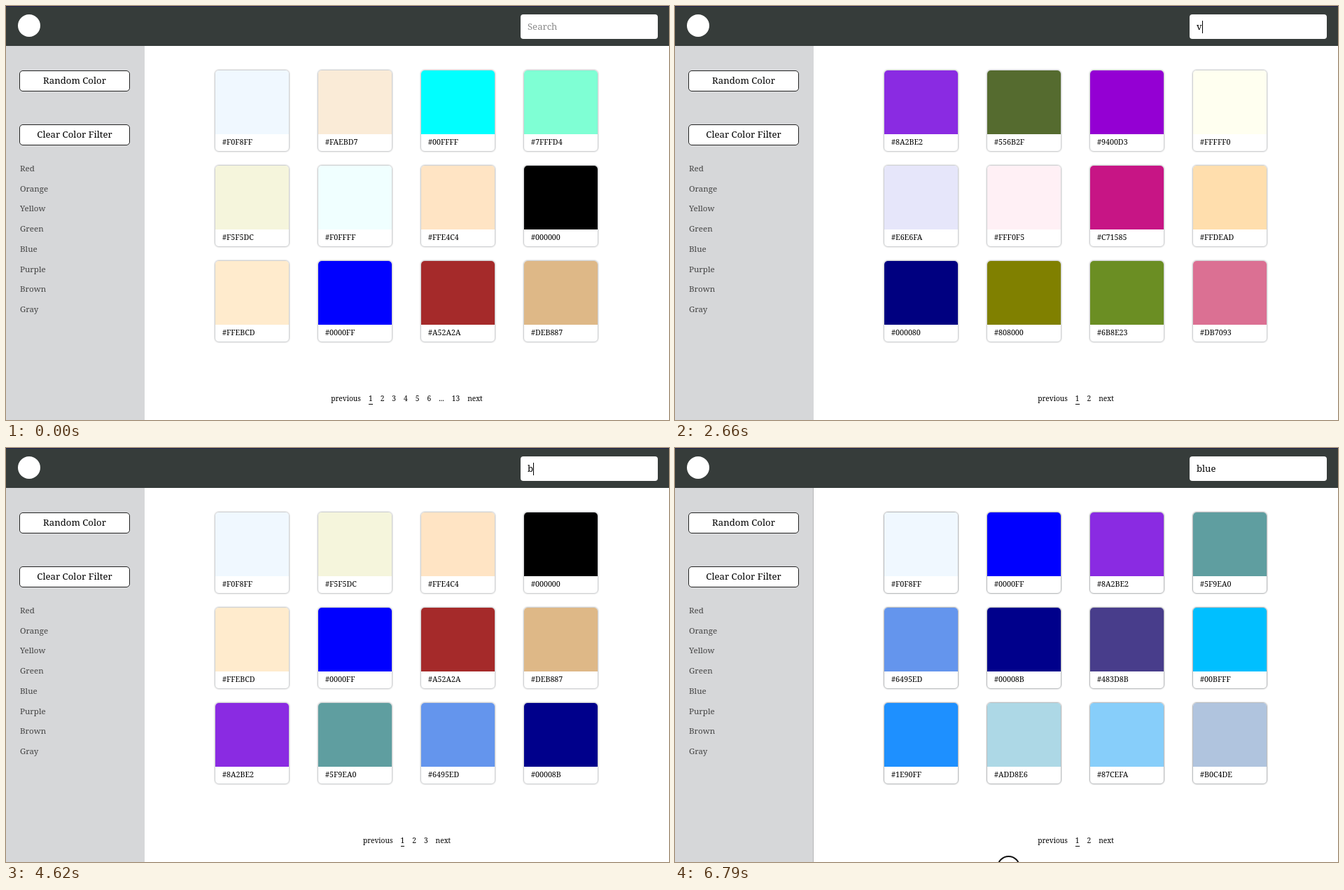
An HTML page that plays this animation: 947 by 591 pixels, repeating every 6.86 s.

```html
<!DOCTYPE html>
<html lang="en">
<head>
<meta charset="utf-8">
<title>Color browser</title>
<style>
  * { box-sizing: border-box; }
  html, body { margin: 0; width: 100%; height: 100%; overflow: hidden; }
  body { position: relative; background: #fff; color: #000; font: 10.7px "Noto Serif", serif; }
  header { position: absolute; inset: 0 0 auto; height: 57px; background: #363c3a; border-top: 1px solid #20224e; }
  .logo { position: absolute; left: 17px; top: 11px; width: 32px; height: 32px; border-radius: 50%; background: #fff; }
  #search { position: absolute; left: 735px; top: 12px; width: 196px; height: 35px; padding-left: 10px;
    border-radius: 4px; background: #fff; font-size: 13.1px; line-height: 34px; display: flex; }
  #caret { width: 1px; height: 18px; margin: 9px -1px 0 0; background: #000; }
  #hint { color: #8a8a8a; }
  aside { position: absolute; left: 0; top: 57px; width: 198px; bottom: 0; background: #d6d7d9;
    border-right: 1px solid #d6d7d9; }
  .button { position: absolute; left: 19px; width: 158px; height: 30px; border: 1px solid #222; border-radius: 5px;
    background: #fff; font-size: 13.2px; line-height: 27px; text-align: center; }
  #filters { position: absolute; left: 20px; top: 161px; font-size: 11.6px; line-height: 28.72px; color: #444; }
  #cards { position: absolute; left: 272px; top: 91px; width: 600px; display: flex; flex-wrap: wrap;
    justify-content: center; gap: 19px 40px; }
  .card { width: 107px; height: 117px; border: 1px solid #d0d2d4; border-radius: 6px; overflow: hidden;
    box-shadow: 0 0 2px #bbb; line-height: 24px; }
  .card i { display: block; height: 91px; margin-bottom: -1px; }
  .card span { margin-left: 10px; }
  .sharp .card { border-color: #bcbec0; }
  .sharp aside { border-color: #b4b5b7; }
  #pages { position: absolute; left: 272px; top: 552px; width: 601px; display: flex; justify-content: center;
    gap: 11px; font-size: 10.2px; line-height: 17px; }
  #pages u { text-decoration: none; height: 17px; border-bottom: 1px solid #000; }
  #pointer, #ring { position: absolute; left: 0; top: 0; }
  #ring { left: 460px; width: 33px; height: 33px; border: 2px solid #111; border-radius: 50%; background: #fff; }
</style>
</head>
<body>
<header><div class="logo"></div></header>
<div id="search"><div id="caret"></div><span id="hint">Search</span></div>
<aside>
  <div class="button" style="top:35px">Random Color</div>
  <div class="button" style="top:112px">Clear Color Filter</div>
  <div id="filters">Red<br>Orange<br>Yellow<br>Green<br>Blue<br>Purple<br>Brown<br>Gray</div>
</aside>
<div id="cards"></div>
<div id="pages"></div>
<svg id="pointer" width="10" height="14"><path d="M.7.7V10.4L3 8.4 4.5 11.8 6.3 11 4.8 7.8H7.8Z" stroke="#fff" stroke-width=".8"/></svg>
<div id="ring"></div>
<script>
const LOOP = 6860, STEP = 70, PER_PAGE = 12;
const CLICK = 1400, FIRST_KEY = 2660;
const names = `AliceBlue AntiqueWhite Aqua Aquamarine Beige Azure Bisque Black BlanchedAlmond Blue Brown BurlyWood
  BlueViolet CadetBlue CornflowerBlue DarkBlue DarkOliveGreen DarkSlateBlue DarkViolet DeepSkyBlue DodgerBlue
  Ivory Lavender LavenderBlush LightBlue LightSkyBlue LightSteelBlue MediumBlue MediumSlateBlue MediumVioletRed
  MidnightBlue NavajoWhite Navy Olive OliveDrab PaleVioletRed PowderBlue RosyBrown RoyalBlue SaddleBrown
  SkyBlue SlateBlue SteelBlue Violet`.split(/\s+/);

// [time, text in the search field]
const keys = [
  [FIRST_KEY, 'v'], [2800, 'vi'], [2940, 'vio'], [3010, 'viol'], [3080, 'viole'], [3220, 'violet'],
  [3850, 'viole'], [3920, 'viol'], [3990, 'vio'], [4060, 'vi'], [4130, 'v'], [4200, ''],
  [4620, 'b'], [4760, 'bl'], [4830, 'blu'], [4900, 'blue']
];

const el = id => document.getElementById(id);
const [search, caret, hint, cards, pages, pointer, ring] =
  ['search', 'caret', 'hint', 'cards', 'pages', 'pointer', 'ring'].map(el);
const typed = document.createElement('span');
search.prepend(typed);
const ink = document.createElement('canvas').getContext('2d');

function toHex(name) {
  ink.fillStyle = name;
  return ink.fillStyle.toUpperCase();
}

function showResults(query) {
  const found = names.filter(n => n.toLowerCase().includes(query));
  cards.innerHTML = found.slice(0, PER_PAGE).map(n =>
    `<div class="card"><i style="background:${n}"></i><span>${toHex(n)}</span></div>`).join('');
  const count = Math.ceil(found.length / PER_PAGE);
  const numbers = query ? Array.from({ length: count }, (_, i) => i + 1) : [1, 2, 3, 4, 5, 6, '...', 13];
  pages.innerHTML = ['previous', ...numbers, 'next']
    .map(p => p === 1 ? '<u>1</u>' : `<span>${p}</span>`).join('');
}

let shown = null;
function draw() {
  const t = Math.floor((performance.now() + 2) % LOOP / STEP) * STEP;
  let [since, query] = [CLICK, ''];
  for (const [at, text] of keys) if (t >= at) [since, query] = [at, text];
  if (query !== shown) {
    showResults(query);
    typed.textContent = shown = query;
    hint.style.display = query ? 'none' : '';
  }
  caret.style.visibility = t >= CLICK && (t - since) % 1000 < 500 ? 'visible' : 'hidden';
  document.body.className = t >= 4830 ? 'sharp' : '';

  const p = Math.min(1, Math.max(0, (t - 210) / 1050));
  const e = p * p * (3 - 2 * p);
  pointer.style.display = t < FIRST_KEY ? '' : 'none';
  pointer.style.transform = `translate(${477 + 308 * e}px, ${592 - 556 * e}px)`;

  ring.style.display = t > 6580 ? '' : 'none';
  ring.style.top = 591 - 9 * (t - 6580) / 210 + 'px';
  requestAnimationFrame(draw);
}
draw();
</script>
</body>
</html>
```
